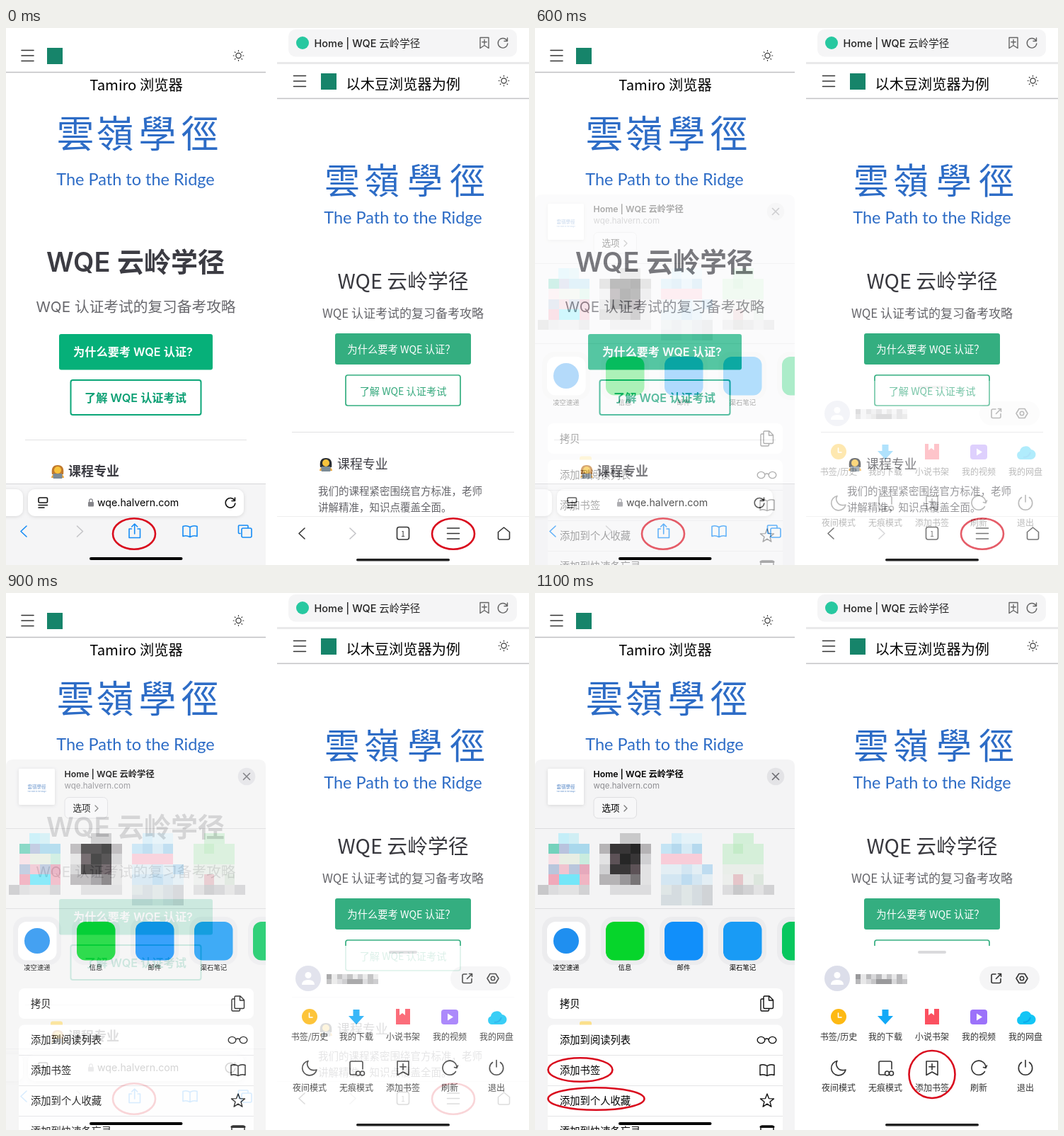
Write an HTML page that moves like this. It is 739x758 px and loops after 3.1 s.

```html
<!DOCTYPE html>
<html lang="zh-CN">
<head>
<meta charset="utf-8">
<title>Bookmark guide</title>
<style>
html, body { margin: 0; height: 100%; overflow: hidden; background: #fff; }
svg { display: block; }
text { font-family: Inter, "Noto Sans CJK SC", "Noto Sans CJK", sans-serif; white-space: pre; }
.noto text, text.noto { font-family: "Noto Sans CJK SC", "Noto Sans CJK", "Noto Sans", sans-serif; }
.mid, .mid text { text-anchor: middle; }
.bold { font-weight: 600; }
.icon { fill: none; stroke: #333; stroke-width: 1.6; stroke-linecap: round; stroke-linejoin: round; }
.blue { stroke: #168cf5; }
.pale { stroke: #c5c5c8; }
.ring { fill: none; stroke: #d90b1d; stroke-width: 2.6; }
.brand { fill: #2d6cc6; text-anchor: middle; font-weight: 500; }
.brand .en { font: 23.5px Lato, sans-serif; }
</style>
</head>
<body>
<svg width="739" height="758" viewBox="0 0 739 758">
<defs>
  <g id="menu" class="icon"><path d="M-8.5-7.500h17M-8.500 0h17M-8.500 7.500h17"/></g>
  <g id="sun" class="icon" style="stroke-width:1.2">
    <circle r="3.600"/>
    <path d="M0-7.300v1M0 6.300v1M-7.300 0h1M6.300 0h1M-5.200-5.200l.7.7M4.500 4.500l.7.7M-5.200 5.200l.7-.7M4.500-4.500l.7-.7"/>
  </g>
  <path id="back" d="M4-7.500L-4 0L4 7.500"/>
  <path id="next" d="M-4-7.500L4 0L-4 7.500"/>
  <path id="book" d="M0-6q-5-3-10-1V7q5-2 10 1q5-3 10-1V-7q-5-2-10 1V8"/>
  <path id="reload" d="M6-3A6.800 6.800 0 1 0 6.800 1M6.500-7v4.500H2"/>
  <path id="mark" d="M-6-7.500H6V7.500L0 3.500L-6 7.500ZM0-4.500V2M-3.200-1.300H3.200"/>
  <g id="coder">
    <path d="M-8 4Q-10-9 0-9T8 4Z"/>
    <circle cy="-2" r="5" fill="#f8c33c"/>
    <path d="M-9 9Q-9 3 0 3T9 9Z" fill="#f0a93a"/>
    <rect x="-6.500" y="3" width="13" height="7" rx="1" fill="#7b8b96"/>
  </g>
  <clipPath id="left"><path d="M0 0H367V758H0Z"/></clipPath>
  <filter id="soft" x="-20%" y="-20%" width="140%" height="140%">
    <feDropShadow dx="0" dy="1" stdDeviation="2.500" flood-opacity=".13"/>
  </filter>
</defs>

<!-- left phone: page -->
<g clip-path="url(#left)">
  <use href="#menu" x="30.500" y="39"/>
  <rect x="58" y="28" width="22" height="23" fill="#16846a"/>
  <use href="#sun" x="328.500" y="39"/>
  <path d="M0 62.500H367" stroke="#bfbfc2" stroke-width="1.500"/>
  <g class="mid">
    <text class="noto" x="184" y="88" font-size="20.300">Tamiro 浏览器</text>
    <g class="brand" font-size="53">
      <text x="98" y="169">雲</text><text x="154" y="169">嶺</text>
      <text x="214" y="169">學</text><text x="274" y="169">徑</text>
      <text class="en" x="183" y="222">The Path to the Ridge</text>
    </g>
    <text class="bold" x="183" y="343.500" font-size="38" fill="#3c3c43">WQE 云岭学径</text>
    <text x="183.500" y="400.500" font-size="20.700" fill="#67676c">WQE 认证考试的复习备考攻略</text>
    <rect x="75" y="432" width="217" height="50.500" rx="3" fill="#06b079"/>
    <text class="bold" x="179.500" y="463" font-size="16.200" fill="#fff">为什么要考 WQE 认证?</text>
    <rect x="91.500" y="497" width="184" height="49" rx="3" fill="none" stroke="#0ba678" stroke-width="2"/>
    <text class="bold" x="183" y="528" font-size="16.200" fill="#0b9f73">了解 WQE 认证考试</text>
  </g>
  <path d="M27 581.500H340" stroke="#e2e2e3"/>
  <use href="#coder" x="73" y="626" fill="#c27a2c"/>
  <text class="bold" x="88" y="632" font-size="18" fill="#3c3c43">课程专业</text>
  <rect y="643" width="367" height="115" fill="#f5f5f6"/>
  <path d="M0 643.500H367" stroke="#d6d6d8"/>
  <g fill="#fff" filter="url(#soft)">
    <rect x="-20" y="651" width="44" height="38" rx="10"/>
    <rect x="31" y="651" width="305" height="38" rx="10"/>
  </g>
  <g class="icon" style="stroke:#111">
    <rect x="46" y="663" width="12.500" height="7" rx="1.500"/>
    <path d="M46 673.500h12.500M46 677h8"/>
    <use href="#reload" x="317" y="670"/>
  </g>
  <rect x="116" y="669" width="8" height="6.500" rx="1" fill="#85858a"/>
  <path d="M117.800 669v-2a2.200 2.200 0 0 1 4.400 0v2" fill="none" stroke="#85858a" stroke-width="1.300"/>
  <text x="129" y="675" font-size="14.200">wqe.halvern.com</text>
  <g class="icon blue">
    <use href="#back" x="25" y="710.500"/>
    <use href="#next" x="104.500" y="710.500" class="pale"/>
    <path d="M177.500 707H174v12.500h15.500V707H186M181.700 714v-13.500M177.700 704l4-4l4 4"/>
    <use href="#book" x="260" y="710.500"/>
    <path d="M331 713.500h-1.500q-1 0-1-1V703q0-1 1-1H341q1 0 1 1v2.500"/>
    <rect x="333" y="706" width="14" height="13" rx="2"/>
  </g>
  <ellipse class="ring" cx="181" cy="714" rx="30" ry="21.700"/>
</g>

<!-- right phone: page -->
<g class="noto">
  <rect x="399" y="2" width="323" height="38.500" rx="10" fill="#f5f5f6"/>
  <rect x="383" y="48" width="356" height="3" fill="#e9e9ea"/>
  <circle cx="419" cy="21" r="9" fill="#27c8a0"/>
  <text x="435.500" y="26.500" font-size="14.500" font-weight="500" fill="#222" style="font-family:Inter,'Noto Sans CJK SC',sans-serif">Home | WQE 云岭学径</text>
  <g class="icon" style="stroke:#666;stroke-width:1.400">
    <use href="#mark" x="676" y="21"/><use href="#reload" x="702" y="21"/>
  </g>
  <use href="#menu" x="415" y="75"/>
  <rect x="445" y="64" width="22" height="23" fill="#16846a"/>
  <text x="480.500" y="87" font-size="20.200">以木豆浏览器为例</text>
  <use href="#sun" x="703.500" y="74.500"/>
  <path d="M383 99.500H739" stroke="#c3c3c5" stroke-width="1.500"/>
  <g class="mid">
    <g class="brand" font-size="50">
      <text x="475" y="234">雲</text><text x="531" y="234">嶺</text>
      <text x="592" y="234">學</text><text x="652" y="234">徑</text>
      <text class="en" x="561" y="275.500">The Path to the Ridge</text>
    </g>
    <text x="561" y="367.500" font-size="28.800" fill="#38383e">WQE 云岭学径</text>
    <text x="561" y="409" font-size="17" fill="#646469">WQE 认证考试的复习备考攻略</text>
    <rect x="465" y="431" width="192" height="44" rx="3" fill="#34ae80"/>
    <text x="558.500" y="459" font-size="14.300" fill="#fff">为什么要考 WQE 认证？</text>
    <rect x="480" y="490" width="162" height="43" rx="3" fill="none" stroke="#34ae80" stroke-width="1.700"/>
    <text x="561" y="517.500" font-size="14.200" fill="#34a87c">了解 WQE 认证考试</text>
  </g>
  <path d="M404 570.500H718" stroke="#e2e2e3"/>
  <use href="#coder" x="452" y="616" fill="#2c2f33"/>
  <text x="468" y="622" font-size="17.900" fill="#3c3c43">课程专业</text>
  <g font-size="14.500" fill="#646469">
    <text x="441" y="658.500">我们的课程紧密围绕官方标准，老师</text>
    <text x="441" y="682">讲解精准，知识点覆盖全面。</text>
  </g>
  <rect x="383" y="689" width="356" height="69" fill="#fff"/>
  <path d="M383 689.500H739" stroke="#eee"/>
  <g class="icon">
    <use href="#back" x="418" y="713.500"/>
    <use href="#next" x="490" y="713.500" class="pale"/>
    <rect x="552.500" y="704.500" width="17" height="17.500" rx="3"/>
    <use href="#menu" x="632" y="713.500"/>
    <path d="M695.500 711.500L703.500 705L711.500 711.500V720q0 2-2 2H697.500q-2 0-2-2Z"/>
  </g>
  <text class="mid" x="561" y="717.500" font-size="10.500" fill="#333">1</text>
  <ellipse class="ring" cx="632" cy="714" rx="30" ry="21.700"/>
</g>

<g id="menus" opacity="0">
  <!-- left share sheet -->
  <g clip-path="url(#left)">
    <path d="M0 758V245q0-10 10-10H357q10 0 10 10V758Z" fill="#f4f4f5"/>
    <rect x="18" y="248" width="51" height="51" rx="2" fill="#fff" filter="url(#soft)"/>
    <g class="mid" fill="#4c80c4">
      <text x="43.500" y="276" font-size="6.500">雲嶺學徑</text>
      <text x="43.500" y="281" font-size="2.600">The Path to the Ridge</text>
    </g>
    <text class="bold" x="82.500" y="260" font-size="12.300">Home | WQE 云岭学径</text>
    <text x="82.500" y="276" font-size="11.500" fill="#8c8c90">wqe.halvern.com</text>
    <rect x="83" y="288.500" width="60.500" height="29.500" rx="6" fill="#f7f7f8" stroke="#dedee0"/>
    <text x="94.500" y="308" font-size="12.600">选项</text>
    <path class="icon" d="M126 300l4 4l-4 4" style="stroke:#777;stroke-width:1.300"/>
    <circle cx="340" cy="259" r="12.300" fill="#e3e3e6"/>
    <path class="icon" d="M335.500 254.500l9 9m0-9l-9 9" style="stroke:#6c6c72"/>
    <path d="M0 332.500H367M0 445.500H367" stroke="#dcdcde"/>
    <g id="people" shape-rendering="crispEdges"></g>
    <g fill="#ececee">
      <rect x="10" y="457" width="68" height="68" rx="18"/>
      <rect x="93" y="457" width="68" height="68" rx="18"/>
      <rect x="176" y="457" width="68" height="68" rx="18"/>
      <rect x="259" y="457" width="68" height="68" rx="18"/>
      <rect x="342" y="457" width="68" height="68" rx="18"/>
    </g>
    <rect x="17" y="464" width="54.500" height="54.500" rx="12" fill="#fff"/>
    <circle cx="44" cy="491" r="18" fill="#1f8ff0"/>
    <rect x="100" y="464" width="54.500" height="54.500" rx="12" fill="#06d52b"/>
    <rect x="183" y="464" width="54.500" height="54.500" rx="12" fill="#118ffa"/>
    <rect x="266" y="464" width="54.500" height="54.500" rx="12" fill="#199bf5"/>
    <rect x="349" y="464" width="54.500" height="54.500" rx="12" fill="#08c75e"/>
    <g class="mid" font-size="9.400">
      <text x="44" y="531.500">凌空速递</text><text x="127" y="531.500">信息</text>
      <text x="210" y="531.500">邮件</text><text x="293.500" y="531.500">渠石笔记</text>
    </g>
    <rect x="18" y="558" width="332" height="43" rx="8" fill="#fff"/>
    <rect x="63" y="604.500" width="17" height="8" rx="3" fill="#fbe08c"/>
    <rect x="18" y="609.500" width="332" height="160" rx="8" fill="#fff"/>
    <path d="M18 652.500H350M18 695.500H350M18 738.500H350" stroke="#e4e4e6"/>
    <g font-size="14.300">
      <text x="35" y="584.500">拷贝</text>
      <text x="35" y="636">添加到阅读列表</text>
      <text x="35" y="679">添加书签</text>
      <text x="35" y="722">添加到个人收藏</text>
      <text x="35" y="765">添加到快速备忘录</text>
    </g>
    <g class="icon" style="stroke:#111;stroke-width:1.400">
      <path d="M323 573h-2.500q-1.500 0-1.500 1.500v14q0 1.500 1.500 1.500H329q1.500 0 1.500-1.500V587"/>
      <path d="M324.500 569H331l5.500 5.500V585q0 1.500-1.500 1.500H324.500q-1.500 0-1.500-1.500V570.500q0-1.500 1.500-1.500ZM330.500 569v6h6"/>
      <ellipse cx="319.500" cy="631" rx="5.300" ry="4.600"/><ellipse cx="335.500" cy="631" rx="5.300" ry="4.600"/>
      <path d="M324.800 630q2.700-2 5.400 0"/>
      <use href="#book" x="328" y="673.500"/>
      <path id="star"/>
      <rect x="319" y="752" width="18" height="16" rx="2"/><path d="M319 753.500h18" stroke-width="3"/>
    </g>
  </g>

  <!-- right browser menu -->
  <g class="noto">
    <rect x="383" y="498" width="356" height="260" fill="#fff"/>
    <rect x="541" y="505" width="40" height="4" rx="2" fill="#dadadc"/>
    <circle cx="427" cy="544" r="18" fill="#dcdeea"/>
    <circle cx="427" cy="539.500" r="4.500" fill="#fff"/>
    <path d="M418 553q0-7 9-7t9 7Z" fill="#fff"/>
    <g id="nick" shape-rendering="crispEdges"></g>
    <rect x="628" y="527" width="85" height="34" rx="17" fill="#f5f5f6"/>
    <g class="icon">
      <path d="M651 538h-4q-2 0-2 2v8.500q0 2 2 2H656q2 0 2-2v-4M651.500 544.500l7-7M654.500 537.500h4v4"/>
      <path d="M684 537.500h8l4 6.500l-4 6.500h-8l-4-6.500Z"/><circle cx="688" cy="544" r="2.700"/>
    </g>
    <circle cx="429" cy="598" r="11" fill="#fdb913"/>
    <path class="icon" d="M428.500 593v6h4.500" style="stroke:#fff"/>
    <path d="M490.500 588h9v9h6.500L495 609L484 597h6.500Z" fill="#12a9f7"/>
    <path d="M551 587h5v9l4-3l4 3v-9h7v22H551Z" fill="#fb5060"/>
    <rect x="615" y="588" width="24" height="21" rx="4" fill="#9c72fa"/>
    <path d="M624 593.500l8 5l-8 5Z" fill="#fff"/>
    <path d="M686 609a6 6 0 0 1-1-11.500a8.500 8.500 0 0 1 16-2.500a7 7 0 0 1-1 14Z" fill="#13c5f5"/>
    <path d="M690 606q8 0 10-7" fill="none" stroke="#0aa8ea" stroke-width="2"/>
    <g class="icon">
      <path d="M427 660.500A10.300 10.300 0 1 0 439 673Q431 675 427.500 670T427 660.500Z"/>
      <path d="M494 680h-6q-2 0-2-2V663q0-2 2-2H502q2 0 2 2v9"/>
      <circle cx="497.500" cy="678" r="3"/><circle cx="503.500" cy="678" r="3"/>
      <path d="M553 661H569V680.500L561 676L553 680.500ZM561 664.500V673M556.800 668.700H565.200"/>
      <path d="M635.500 675.500A10 10 0 1 1 637 670.500M637 670.500l-3.500-1M637 670.500l1.500-3.500"/>
      <path d="M687.500 662.500A9.700 9.700 0 1 0 698.500 662.500M693 659.500V669"/>
    </g>
    <g id="labels" class="mid" font-size="12" fill="#333"></g>
  </g>
</g>

<g id="rings" class="ring" visibility="hidden">
  <ellipse cx="64" cy="673" rx="45.500" ry="16.800"/>
  <ellipse cx="86.500" cy="714" rx="68" ry="15.800"/>
  <ellipse cx="561" cy="679.500" rx="32.500" ry="33.500"/>
</g>
<rect x="118" y="747" width="131.500" height="4" rx="2"/>
<rect x="495" y="749" width="132" height="3.500" rx="1.700" fill="#222"/>
</svg>
<script>
const $ = id => document.getElementById(id);

let seed = 7;
const rand = () => (seed = seed * 16807 % 2147483647) / 2147483647;

// Blurred-out patch: cells coloured at random from a palette
function mosaic(group, x, y, cols, rows, size, palette) {
  const colors = palette.split(' ');
  for (let r = 0; r < rows; r++) for (let c = 0; c < cols; c++) {
    const color = colors[Math.floor(rand() * colors.length)];
    group.innerHTML += `<rect x="${x + c * size}" y="${y + r * size}" width="${size}" height="${size}" fill="#${color}"/>`;
  }
}

const gray = 'd2d2d4 dcdcde c8c8ca e2e2e3';
const face = (x, row, cols, rows, palette) =>
  mosaic($('people'), x, 339 + row * 14.5, cols, rows, 14.5, palette);

face(33, 0, 2, 1, 'c4eef8 d0eef4');
face(19, 1, 4, 1, 'b9c3de 74d2bc a9d8ec f3d9e0');
face(19, 2, 4, 1, 'f8dfe5 c9ecdf e8eee4');
face(19, 3, 4, 1, 'e6a9bc f0c4d0 b9c6dc');
face(19, 4, 1, 1, 'f0a9ba');
face(33.5, 4, 2, 1, '55e2fa 74e6f8');
face(62.5, 4, 1, 1, 'f0b5c3');
face(4, 5, 5, 1, gray);

face(120, 0, 2, 1, 'd8d8d8 c9c9ca');
face(91, 1, 5, 4, 'd0d0d2 e2e2e3 b5b3b5');
face(105.5, 1, 3, 3, '262626 383637 5d5257');
face(120, 4, 2, 1, '777476 99979a');
face(105.5, 5, 4, 1, gray);

face(192.5, 0, 3, 1, 'd6edf8 e4f2f8');
face(178, 1, 4, 2, 'c4e4f4 d5eaf5 f8ccd8 b5d9ee');
face(178, 3, 5, 2, 'bedcf0 d3e6f2 e3eef4');
face(178, 5, 5, 2, 'd5dce0 d0d3d6 dfe6e6');

face(279.5, 0, 2, 1, 'd3efd8 e6f2e6');
face(265, 1, 4, 2, 'c4ebc8 d5efd9');
face(265, 3, 4, 1, 'e9eee9 d6e6d9 c4dfca');
face(265, 4, 4, 1, 'eceeec e5c5c9 dce6dd');
face(265, 5, 5, 1, gray);

mosaic($('nick'), 453, 537.5, 10, 2, 7.3, 'b8b8ba 99999b d8d8da c5c5c7 e8e8e9');

$('star').setAttribute('d', 'M' + Array.from({ length: 10 }, (_, i) => {
  const a = i * Math.PI / 5, r = i % 2 ? 4.2 : 10;
  return [328 + r * Math.sin(a), 717 - r * Math.cos(a)].map(v => v.toFixed(1));
}).join('L') + 'Z');

'书签/历史 我的下载 小说书架 我的视频 我的网盘 夜间模式 无痕模式 添加书签 刷新 退出'.split(' ').forEach((label, i) => {
  $('labels').innerHTML += `<text x="${429 + i % 5 * 66}" y="${i < 5 ? 631 : 703}">${label}</text>`;
});

// Six-step dissolve to the menus, then the rings appear
function draw(now) {
  const t = now % 3100;
  const step = Math.floor((t - 500) / 100) + 1;
  $('menus').setAttribute('opacity', Math.max(0, Math.min(1, step / 6)));
  $('rings').setAttribute('visibility', t < 1100 ? 'hidden' : 'visible');
}

const start = performance.now();
function tick() {
  draw(performance.now() - start);
  requestAnimationFrame(tick);
}
tick();
</script>
</body>
</html>
```
